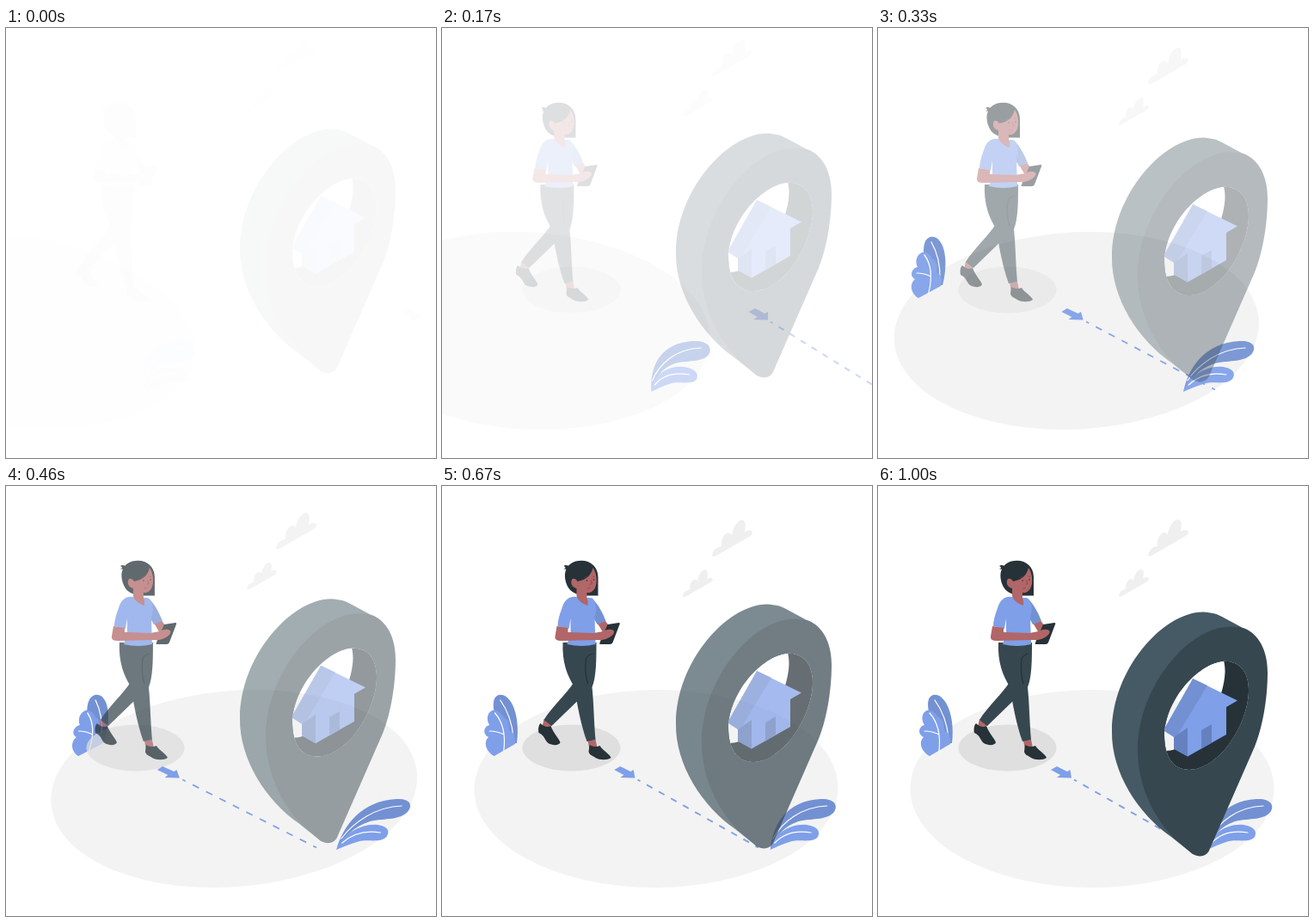
These frames come from a looping animation (500 by 500 pixels, 1.04 s). An HTML page:

```html
<!DOCTYPE html>
<html lang="en">
<head>
<meta charset="utf-8">
<title>Location pin</title>
<style>
html, body { margin: 0; height: 100%; overflow: hidden; background: #fff }
svg { display: block; width: 100vw; height: 100vh }
.blue { fill: #7f9fe9 }
.shade { fill: #7391d2 }
.vein { fill: none; stroke: #fff; stroke-width: 1.2; stroke-linecap: round }
.skin { fill: #b16668 }
.dark { fill: #263238 }
.slate { fill: #37474f }
</style>
</head>
<body>
<svg viewBox="0 0 500 500">
  <defs>
    <path id="hole" d="M402 203.500C420 203.500 431 215 431 238C430 280 395 330 362 330C343 330 333 315 333 290C334 250 370 207 402 203.500Z"/>
    <clipPath id="inside"><use href="#hole"/></clipPath>
    <path id="cloud" d="M314 81L315 77C317 72 322 70 325 70C324 62 328 54 333 54C336 54 337 57 337 57C338 47 344 39 349 39C354 40 353 46 352 53C357 50 361 50 361 55L358 58L318 81Q316 82 314 81Z"/>
  </defs>

  <g id="clouds" fill="#efefef">
    <use href="#cloud"/>
    <use href="#cloud" transform="translate(280 97) scale(.745) translate(-314 -39)"/>
  </g>

  <g id="ground">
    <ellipse cx="249" cy="352" rx="211.500" ry="115" fill="#f3f3f3"/>
    <path class="shade" d="M72 300C60 272 52 247 64 243C77 240 90 264 86 299Z"/>
    <path class="vein" d="M82 292C80 275 74 260 66 249"/>
    <path class="blue" d="M60 314C52 310 46 299 53 292C45 288 48 279 54 278C48 268 54 259 61 261C68 263 68 268 72 270C80 275 74 284 80 286C85 290 84 296 84 300Z"/>
    <path class="vein" d="M71 308C73 290 69 274 60 264M54 285Q63 285 71 289"/>
    <path class="shade" d="M383 423C385 395 400 366 440 364C456 363 461 371 457 378C450 389 432 386 415 390C398 396 388 408 383 423Z"/>
    <path class="blue" d="M383 423C386 405 405 392 425 394C438 396 441 402 438 408C433 415 420 411 408 413C397 416 390 420 383 423Z"/>
    <path class="vein" d="M386 410C396 391 418 373 448 372M388 415C398 404 412 400 430 403"/>
  </g>

  <ellipse id="shadow" cx="150.500" cy="304.500" rx="57" ry="27" fill="#dfdfdf"/>

  <g id="arrow">
    <path class="blue" d="M201 330L208 326L220 332L223.500 330L225 339.500L208 339L212 336Z"/>
    <path d="M228 341.500L367 420.500" fill="none" stroke="#7f9fe9" stroke-width="1.900" stroke-dasharray="7.500 8.500" stroke-dashoffset="4"/>
  </g>

  <g id="pin">
    <path fill="#455a64" fill-rule="evenodd" d="M366 428L341 408C303 382 271 333 272 285C272 215 330 147 378 146.500C388 147 395 149 400 152L426 166L410 260ZM402 203.500C420 203.500 431 215 431 238C430 280 395 330 362 330C343 330 333 315 333 290C334 250 370 207 402 203.500Z"/>
    <path class="slate" fill-rule="evenodd" d="M384.500 425C381 431 373 432 366 428L345 410C322 387 302 350 302 307C302 235 360 163 411 163.500Q419 163.500 426 165.500C442 172 453 190 453 217C453 248 447 281 438 303ZM402 203.500C420 203.500 431 215 431 238C430 280 395 330 362 330C343 330 333 315 333 290C334 250 370 207 402 203.500Z"/>
    <path class="dark" clip-path="url(#inside)" fill-rule="evenodd" d="M402 203.500C420 203.500 431 215 431 238C430 280 395 330 362 330C343 330 333 315 333 290C334 250 370 207 402 203.500ZM374 182C392 182 403.500 193 403.500 216C402 258 367 308 334 308C315 308 305 293 305 268C306 228 342 185 374 182Z"/>
    <path class="blue" d="M366 224L418 249.500L405 257L405 289L360 314.500L344 305.500V291Z"/>
    <path class="shade" d="M366 224L383 232L348 290L344 292L333 285V282Z"/>
    <path fill="#6581bf" d="M344 292L360 281V314.500L344 305.500ZM376 284L388 277V298.500L376 305.500Z"/>
  </g>

  <g id="woman">
    <path class="skin" d="M118 271L127 278L123 284L116 280ZM169 296L178 295L180 304L171 306Z"/>
    <path class="dark" d="M114 276C118 280 123 281 126 279C129 287 135 293 137 298C136 302 128 302 123 299C119 296 119 290 112 287C111 282 112 278 114 276ZM171 301C176 304 181 303 183 302C187 308 195 312 196 316C192 319 183 319 178 316C174 313 171 313 170 309Z"/>
    <path class="slate" d="M153 228C145 241 127 257 118 272L127 279L158 249C167 235 169 210 167 195Z"/>
    <path class="slate" d="M140 182C139 205 145 220 153 233C157 255 161 278 168 297L178 295C176 272 176 252 174 234C179 222 179 202 179 182Z"/>
    <path d="M175 195Q168 197 167 201Q165 217 169 230" fill="none" stroke="#263238" stroke-width="1.200"/>
    <path class="skin" d="M180 159L188 155L194 163L187 171Z"/>
    <path class="dark" d="M192 161L205 159Q207 159 206 161L198 182Q197 184 195 184H184Q182 184 183 182Z"/>
    <path class="shade" d="M173 131C179 133 187 149 190 157L180 161L174 150Z"/>
    <path class="blue" d="M155 129C148 128 142 132 139 142C136 150 134 157 134 163L147 166L149 154L149 170L145 184Q162 188 178 184L177 152C181 143 178 130 172 130Z"/>
    <path class="skin" d="M133 163L146 165L146 170L176 171L187 169Q194 165 199 168Q201 170 197 174Q190 180 181 179L138 180Q130 180 131 175Z"/>
    <path class="dark" d="M147 119C140 108 140 92 155 87.500C169 84 181 92 181 106L181 127.500H168C158 127 150 124 147 119ZM147 97L141 96.500Q145 95 141 93Q145 90 149 95Z"/>
    <path class="skin" d="M151 108C154 107 156 109 157 111C167 109 173 104 175 95C178 99 180 107 179 113C178 121 173 125 168 124L168 130Q170 134 169 139C162 137 157 132 156 128L156 119C151 118 148 113 151 108Z"/>
    <g class="dark"><circle cx="168" cy="110" r=".8"/><circle cx="176" cy="109" r=".8"/></g>
    <path d="M165 106.500L169 105.500M174.500 105L177 105.500M172.500 109.500L174 114L171.500 114M168.500 119L172 118.500" fill="none" stroke="#7c3f43" stroke-width=".6"/>
  </g>
</svg>
<script>
const LOOP = 1040, STEP = 41.6, LEAD = 35;
const el = id => document.getElementById(id);
const lerp = (a, b, u) => a + (b - a) * u;
const bez = (a, b, s) => 3 * (1 - s) ** 2 * s * a + 3 * (1 - s) * s * s * b + s ** 3;

// cubic-bezier(.36, -.01, .5, 1.38)
function ease(u) {
  let lo = 0, hi = 1;
  for (let i = 0; i < 24; i++) {
    const mid = (lo + hi) / 2;
    if (bez(.36, .5, mid) < u) lo = mid; else hi = mid;
  }
  return bez(-.01, 1.38, lo);
}

function place(id, transform, opacity) {
  el(id).setAttribute("transform", transform);
  el(id).setAttribute("opacity", Math.max(0, Math.min(1, opacity)));
}

// Slides in while leaning, swings past the end, then settles; side is -1 (left) or 1 (right).
function speedIn(id, p, side, pivot) {
  const e = ease(Math.min(1, p / .6));
  const lean = p < .6 ? lerp(20, -10, e)
    : p < .8 ? lerp(-10, 2, ease((p - .6) / .2))
    : lerp(2, 0, ease((p - .8) / .2));
  const k = -side * Math.tan(lean * Math.PI / 180);
  const x = side * 248 * (1 - e);
  place(id, `matrix(1 0 ${k} 1 ${x - k * pivot} 0)`, e);
}

function draw(now) {
  const step = Math.floor(now % LOOP / STEP + .1);
  const p = Math.min(1, ((step < 2 ? 0 : step) * STEP + LEAD) / 1000);
  const e = ease(p), shift = -30 * (1 - e);
  place("clouds", `translate(0 ${shift})`, e);
  place("woman", `translate(${shift} 0)`, e);
  place("shadow", "", e);
  place("pin", `translate(0 ${-30 * (1 - p)})`, p);
  speedIn("ground", p, -1, 352);
  speedIn("arrow", p, 1, 372);
}

function tick() {
  draw(performance.now());
  requestAnimationFrame(tick);
}
tick();
</script>
</body>
</html>
```
